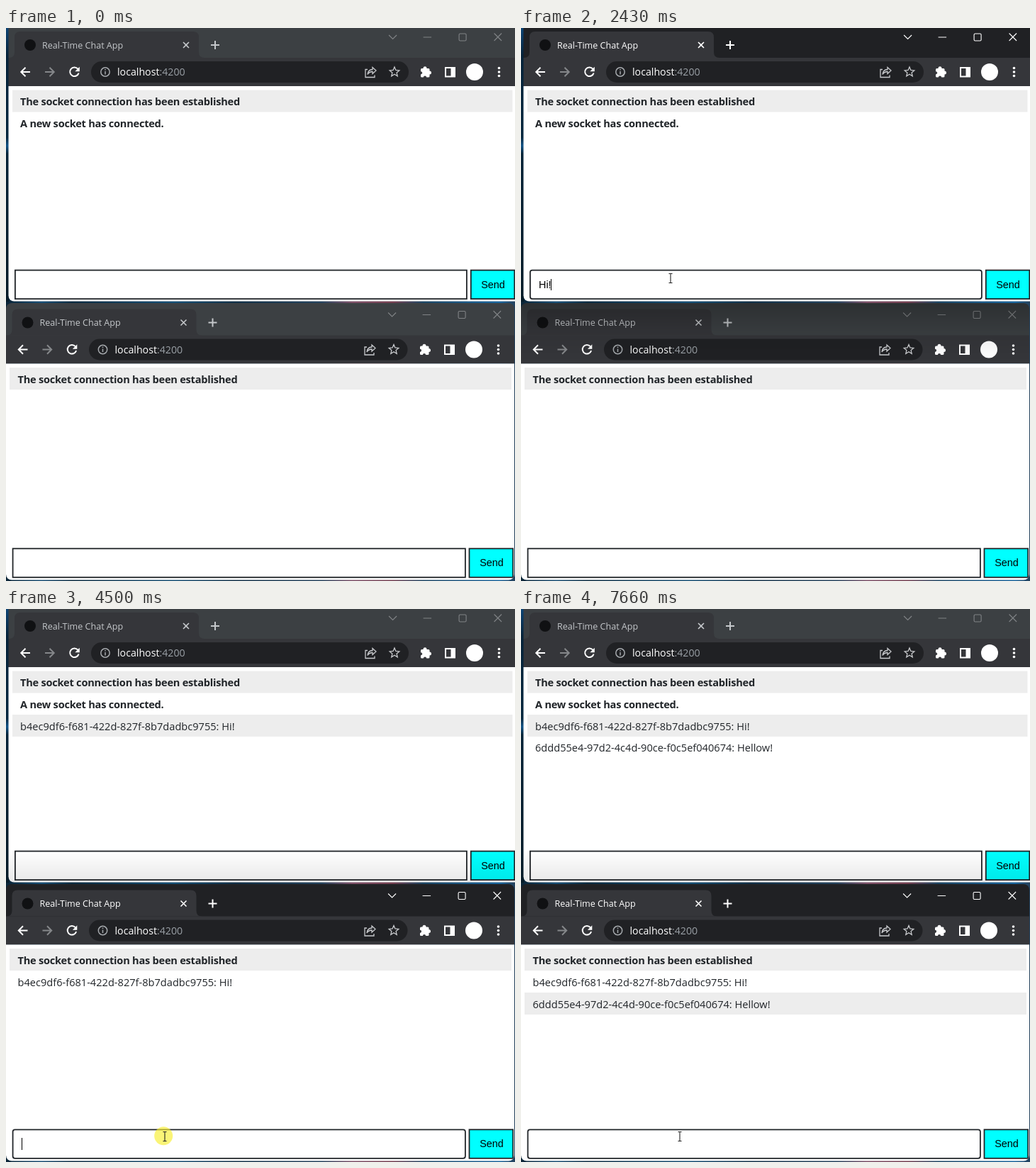
These frames come from a looping animation (718 px wide and 780 px high, 8 s). An HTML page:

```html
<!DOCTYPE html>
<html lang="en">
<head>
<meta charset="utf-8">
<title>Real-Time Chat App</title>
<style>
  html, body { margin: 0; width: 100%; height: 100%; overflow: hidden; background: #0b2233; }
  svg { display: block; }
  text { font: 14.6px "Open Sans", "Noto Sans", sans-serif; fill: #212529; white-space: pre; }
  .bold { font-weight: 700; letter-spacing: -.24px; }
  .title { font-size: 12.55px; fill: var(--title); }
  .url { font-size: 14.2px; fill: #fff; }
  .port { fill: #9aa0a6; }
  .form text { font: 14.4px "Liberation Sans", Arial, sans-serif; fill: #000; }
  .send { text-anchor: middle; }
  .row { fill: #ededed; }
  .line { fill: none; stroke: #fff; stroke-width: 2; }
  .thin { stroke-width: 1.1; stroke: var(--ctrl); }
  .tool { stroke-width: 1.3; stroke: #c8cacd; }
  .info { stroke-width: 1.5; stroke: #a5a9ad; }
  .box { fill: #fff; stroke: #212529; stroke-width: 1.8; }
  .button { fill: #0ff; }
  .shade { opacity: var(--shade); }

  .win, .win *, .timed { animation: 8s step-end infinite; }
  .win { --strip: #3c4043; --title: #c4c7ca; --ctrl: #808386; --round: 0px; --shade: 0; }
  #w1 { animation-name: active1; }
  #w2 { animation-name: active2; }
  .field { rx: var(--round); }
  @keyframes active1 {
    9.5% { --strip: #202124; --title: #fff; --ctrl: #fff; --round: 3px; }
    54.875% { --strip: #3c4043; --title: #c4c7ca; --ctrl: #808386; --round: 0px; --shade: 1; }
  }
  @keyframes active2 {
    9.5% { --shade: 1; }
    54.875%, 100% { --strip: #202124; --title: #fff; --ctrl: #fff; --round: 3px; --shade: 0; }
  }

  /* the white cover slides right as letters are typed */
  #w1 .typing { animation-name: type1; }
  #w2 .typing { animation-name: type2; }
  @keyframes type1 {
    0%, 33.625% { transform: none; }
    18.875% { transform: translateX(10px); }
    24.375% { transform: translateX(13px); }
    30.375% { transform: translateX(17px); }
  }
  @keyframes type2 {
    0%, 94.5% { transform: none; }
    64.125% { transform: translateX(9px); }
    66.625% { transform: translateX(18px); }
    68.5% { transform: translateX(21px); }
    70.125% { transform: translateX(24px); }
    72.625% { transform: translateX(32px); }
    75.5% { transform: translateX(42px); }
    88.875% { transform: translateX(46px); }
  }
  #w1 .caret { animation-name: blink1; }
  #w2 .caret { animation-name: blink2; }
  @keyframes blink1 {
    0%, 16%, 36.875%, 50.5%, 100% { opacity: 0; }
    9.5%, 18.875%, 44% { opacity: 1; }
  }
  @keyframes blink2 {
    0%, 62.875%, 81.875%, 95.75%, 100% { opacity: 0; }
    56.25%, 64.125%, 88.5% { opacity: 1; }
  }

  #w1 .hi, #w2 .hi { animation-name: hi; }
  #w1 .reply { animation-name: reply1; }
  #w2 .reply { animation-name: reply2; }
  @keyframes hi { 0% { opacity: 0; } 33.625%, 100% { opacity: 1; } }
  @keyframes reply1 { 0% { opacity: 0; } 95%, 100% { opacity: 1; } }
  @keyframes reply2 { 0% { opacity: 0; } 94.5%, 100% { opacity: 1; } }

  #mouse { animation: move 8s linear infinite; }
  #arrow { animation-name: arrow; }
  #beam { animation-name: beam; }
  #click { animation-name: click; }
  @keyframes move {
    0%, .75% { transform: translate(623px, 727px); animation-timing-function: cubic-bezier(.3, .2, .35, 1); }
    6.5%, 43.9% { transform: translate(211px, 353px); animation-timing-function: cubic-bezier(.5, .1, .8, .8); }
    47.25% { transform: translate(236px, 490px); animation-timing-function: cubic-bezier(.3, .3, .7, .8); }
    50.875% { transform: translate(217px, 659.5px); animation-timing-function: cubic-bezier(.2, .5, .5, 1); }
    53.875%, 100% { transform: translate(224px, 744px); }
  }
  @keyframes arrow {
    0%, 4.75%, 53%, 100% { opacity: 0; }
    .75%, 45.4% { opacity: 1; }
  }
  @keyframes beam {
    0%, 45.4% { opacity: 0; }
    4.75%, 53%, 100% { opacity: 1; }
  }
  @keyframes click {
    0%, 10.25%, 57.125%, 100% { opacity: 0; }
    9%, 54.375% { opacity: 1; }
  }
</style>
</head>
<body>
<svg width="718" height="780" viewBox="0 0 718 780">
  <defs>
    <linearGradient id="side" x2="0" y2="1">
      <stop offset="0" stop-color="#0d4576"/><stop offset=".1" stop-color="#06233a"/>
      <stop offset=".4" stop-color="#07283f"/><stop offset=".43" stop-color="#125488"/>
      <stop offset=".46" stop-color="#072438"/><stop offset="1" stop-color="#061b28"/>
    </linearGradient>
    <linearGradient id="gap">
      <stop offset="0" stop-color="#0b2436"/><stop offset=".07" stop-color="#184f76"/>
      <stop offset=".13" stop-color="#0c2b40"/><stop offset=".33" stop-color="#154f75"/>
      <stop offset=".45" stop-color="#123047"/><stop offset=".62" stop-color="#25435d"/>
      <stop offset=".68" stop-color="#7d5068"/><stop offset=".76" stop-color="#743f50"/>
      <stop offset=".82" stop-color="#1d4664"/><stop offset=".97" stop-color="#1a659d"/>
      <stop offset="1" stop-color="#24405a"/>
    </linearGradient>
    <linearGradient id="above" x2="0" y2="1">
      <stop offset="0" stop-opacity="0"/><stop offset="1" stop-opacity=".09"/>
    </linearGradient>
    <linearGradient id="below" x2="0" y2="1">
      <stop offset="0" stop-opacity=".25"/><stop offset=".5" stop-opacity=".08"/><stop offset="1" stop-opacity="0"/>
    </linearGradient>
    <clipPath id="shape1"><rect x="3.5" y="-20" width="740" height="405.5" rx="8"/></clipPath>
    <clipPath id="shape2"><rect y="388" width="717" height="390.5" rx="8"/></clipPath>

    <g id="left">
      <path d="M4 42Q12 42 12 34V13Q12 5 20 5H264Q272 5 272 13V34Q272 42 280 42Z" fill="#35363a"/>
      <circle cx="34" cy="24" r="8" fill="#101113"/>
      <text class="title" x="51" y="28.5">Real-Time Chat App</text>
      <path class="line" style="stroke:var(--title);stroke-width:1.6" d="M250 20l8 8m0-8l-8 8"/>
      <path class="line" style="stroke:var(--title)" d="M289 24h12m-6-6v12"/>
      <path class="line" d="M34 62H21.5m6-6.2L21.3 62l6.2 6.2"/>
      <path class="line" style="stroke:#85878a" d="M55 62h12.5m-6-6.2L67.7 62l-6.2 6.2"/>
      <path class="line" d="M101.3 57.6A6.3 6.3 0 1 0 102.6 63.5"/>
      <path d="M103.8 54.8v6.4h-6.4z" fill="#fff"/>
    </g>

    <g id="address">
      <circle class="line info" cx="140" cy="62" r="6.2"/>
      <path class="line info" d="M140 61v4.5m0-7.5v1.6"/>
      <text class="url" x="157" y="67">localhost<tspan class="port">:4200</tspan></text>
    </g>

    <g id="right">
      <g transform="translate(-.4 -.5)">
        <path class="line thin" d="M540.5 10.5l5.500 5.500 5.500-5.500M589 13.500h11.500M689 8l10.500 10.500m0-10.500L689 18.500"/>
        <rect class="line thin" x="639.500" y="8.500" width="10" height="10" rx="1.500"/>
      </g>
      <path class="line tool" d="M510 58.500H507V69.500H520V66.500M510 65.500C510.500 61 513 58.700 517 58.500V55.500L522 60L517 64.500V61.500C514 61.500 512 62.500 510 65.500Z"/>
      <path class="line tool" d="M548 55l1.900 4.500 4.900.4-3.700 3.200 1.100 4.800-4.200-2.600-4.200 2.600 1.100-4.800-3.700-3.200 4.900-.4z"/>
      <g fill="#fff">
        <rect x="585" y="57" width="12.500" height="12.500" rx="1.500"/>
        <circle cx="591" cy="56.800" r="2.500"/><circle cx="597.500" cy="63" r="2.500"/>
        <g fill="#35363a"><circle cx="585" cy="63.300" r="2.100"/><circle cx="591" cy="69.500" r="2.100"/></g>
        <rect class="line" x="620" y="56" width="13" height="12.500"/>
        <rect x="627.500" y="56" width="5.500" height="12.500"/>
        <circle cx="661" cy="62" r="12"/>
        <circle cx="695.500" cy="56.500" r="1.800"/><circle cx="695.500" cy="62" r="1.800"/><circle cx="695.500" cy="67.500" r="1.800"/>
      </g>
    </g>
  </defs>

  <rect width="718" height="780" fill="url(#gap)"/>
  <rect width="4" height="386" fill="url(#side)"/>

  <g id="w1" class="win" clip-path="url(#shape1)">
    <rect width="718" height="42" style="fill:var(--strip)"/>
    <rect y="42" width="718" height="40" fill="#35363a"/>
    <rect y="82" width="718" height="304" fill="#fff"/>
    <rect x="120" y="47" width="448" height="30" rx="15" fill="#202124"/>
    <use href="#left"/><use href="#address"/><use href="#right"/>
    <rect class="row" x="9" y="87.500" width="705.500" height="31"/>
    <text class="bold" x="20" y="109">The socket connection has been established</text>
    <text class="bold" x="20" y="139.500">A new socket has connected.</text>
    <g class="hi">
      <rect class="row" x="9" y="149" width="705.500" height="31"/>
      <text x="20" y="170.500">b4ec9df6-f681-422d-827f-8b7dadbc9755: Hi!</text>
    </g>
    <text class="reply" x="20" y="201">6ddd55e4-97d2-4c4d-90ce-f0c5ef040674: Hellow!</text>
    <g class="form">
      <rect class="box field" x="12.900" y="341.600" width="637" height="40.500"/>
      <text x="25" y="367">Hi!</text>
      <g class="typing">
        <rect x="25" y="350" width="60" height="24" fill="#fff"/>
        <rect class="caret" x="25" y="354" width="1" height="16"/>
      </g>
      <rect class="box button" x="655.800" y="341.600" width="61.500" height="40.500"/>
      <text class="send" x="687" y="366.700">Send</text>
    </g>
    <rect class="shade" y="340" width="718" height="46" fill="url(#above)"/>
  </g>

  <g id="w2" class="win" clip-path="url(#shape2)">
    <rect y="388" width="718" height="46" style="fill:var(--strip)"/>
    <rect y="433.500" width="718" height="40" fill="#35363a"/>
    <rect y="473.400" width="718" height="306" fill="#fff"/>
    <rect x="117" y="438.500" width="449.500" height="30" rx="15" fill="#202124"/>
    <use href="#left" x="-3.500" y="391.500"/>
    <use href="#address" x="-3.500" y="391.500"/>
    <use href="#right" x="-1" y="391.500"/>
    <rect class="row" x="5" y="479" width="708" height="31"/>
    <text class="bold" x="16.500" y="501">The socket connection has been established</text>
    <text class="hi" x="16.500" y="531.500">b4ec9df6-f681-422d-827f-8b7dadbc9755: Hi!</text>
    <g class="reply">
      <rect class="row" x="5" y="541" width="708" height="31"/>
      <text x="16.500" y="562.500">6ddd55e4-97d2-4c4d-90ce-f0c5ef040674: Hellow!</text>
    </g>
    <g class="form">
      <rect class="box field" x="9.600" y="734.300" width="638.300" height="40.500"/>
      <text x="21.600" y="759.300">Hellow!</text>
      <g class="typing">
        <rect x="22" y="742" width="70" height="24" fill="#fff"/>
        <rect class="caret" x="22" y="746" width="1" height="17"/>
      </g>
      <rect class="box button" x="653.500" y="734.300" width="61.700" height="40.500"/>
      <text class="send" x="685" y="759.300">Send</text>
    </g>
    <rect class="shade" y="388" width="718" height="80" fill="url(#below)"/>
  </g>

  <g id="mouse">
    <circle id="click" class="timed" cx="-1.800" cy="-.8" r="13" fill="#f8ee30" fill-opacity=".66"/>
    <path id="arrow" class="timed" d="M.5.5v14.500l3.300-3.100 2.200 5.100 2.300-1-2.200-5h4.500z" fill="#fff" stroke="#111" stroke-linejoin="round"/>
    <path id="beam" class="timed" d="M-2.500-6.500h2l.5.500.5-.5h2M0-6V6M-2.500 6.500h2L0 6l.5.500h2" fill="none" stroke="#222" stroke-width="1.100"/>
  </g>
</svg>
</body>
</html>
```
